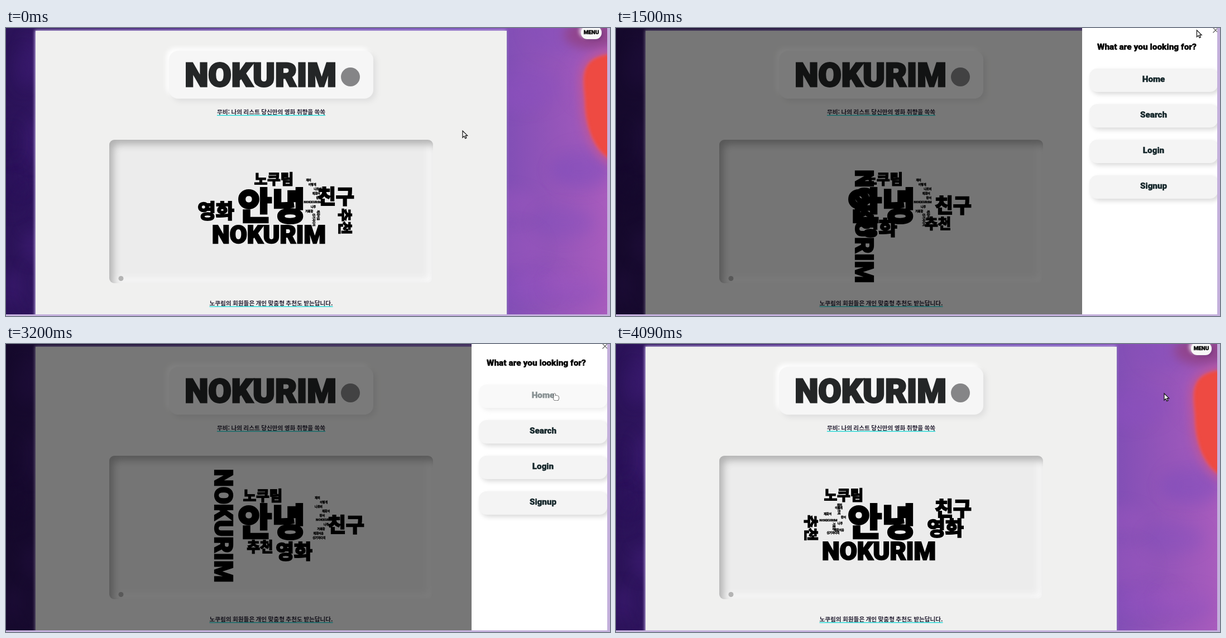
An HTML page with a canvas that plays this animation: 1082 by 518 pixels, repeating every 4160 ms.

```html
<!DOCTYPE html>
<html lang="ko">
<head>
<meta charset="utf-8">
<title>NOKURIM</title>
<style>
html, body { margin: 0; width: 100%; height: 100%; overflow: hidden; background: #c4b0dc; }
#view { position: absolute; left: 0; top: 0; width: 1077px; height: 515px; overflow: hidden; }
#view * { position: absolute; box-sizing: border-box; }
canvas { left: 0; top: 0; }
.panel { left: 53px; top: 5px; width: 844px; height: 530px; background: #f0f0ef;
  box-shadow: 1px 0 2px rgba(110, 95, 165, .8), -1px -1px 5px #dfcdfb; }
.card { left: 292px; top: 41px; width: 366px; height: 86px; border-radius: 16px; background: #f6f6f6;
  box-shadow: 5px 5px 10px #dfdfdf, -5px -5px 9px #fff; }
.well { left: 185px; top: 201px; width: 580px; height: 258px; border-radius: 9px; background: #ececec;
  box-shadow: inset 7px 8px 14px #b0b0b0, inset -7px -7px 14px #fafafa; }
.menu, .drawer { font: 900 15.2px Roboto, Arial, sans-serif; text-align: center; white-space: nowrap;
  -webkit-text-stroke: .4px; }
.menu { left: 1030px; top: -3px; width: 37px; height: 23px; border-radius: 11px; background: #f7f7f7;
  font-size: 9.8px; line-height: 21px; color: #000;
  box-shadow: -3px -3px 6px rgba(255, 255, 255, .75), 2px 2px 4px rgba(60, 20, 90, .3); }
.dim { left: 0; top: 0; width: 1077px; height: 515px; background: #000; }
.drawer { left: 834px; top: 0; width: 256px; height: 515px; background: #fff; }
.title { left: 16px; top: 24px; width: 200px; font-size: 15.4px; line-height: 20px; color: #000; }
.close { left: 234px; top: -1px; width: 10px; height: 10px; }
.link { left: 13px; width: 230px; height: 42px; border-radius: 14px; background: #f4f4f4; color: #14262a;
  line-height: 38px; box-shadow: 4px 4px 8px #dadada, -4px -4px 6px #fff; }
.bare { background: none; }
.bare .title, .bare .close { display: none; }
.bare .link { box-shadow: 3px 3px 6px rgba(90, 40, 110, .2), -4px -4px 7px rgba(255, 255, 255, .8); }
</style>
</head>
<body>
<div id="view">
  <canvas id="back" width="1077" height="515"></canvas>
  <div class="panel"></div>
  <div class="card"></div>
  <div class="well"></div>
  <canvas id="page" width="1077" height="515"></canvas>
  <div class="menu">MENU</div>
  <div class="dim"></div>
  <div class="drawer">
    <div class="title">What are you looking for?</div>
    <svg class="close" viewBox="0 0 10 10"><path d="M.5 .5 9.5 9.5M9.5 .5 .5 9.5" stroke="#555" stroke-width="1.1"/></svg>
    <div class="link">Home</div>
    <div class="link">Search</div>
    <div class="link">Login</div>
    <div class="link">Signup</div>
  </div>
  <canvas id="pointer" width="1077" height="515"></canvas>
</div>
<script>
const LOOP = 4160;
const LATIN = 'Roboto, Arial, sans-serif';
const HANGUL = '"Noto Sans CJK KR", "Noto Sans CJK", sans-serif';
const $ = s => document.querySelector(s);
const pen = id => $(id).getContext('2d');
const back = pen('#back'), page = pen('#page'), pointer = pen('#pointer');
const dim = $('.dim'), drawer = $('.drawer'), home = $('.link');
document.querySelectorAll('.link').forEach((el, i) => { el.style.top = 73 + 64.1 * i + 'px'; });

const span = (t, from, dur) => Math.max(0, Math.min(1, (t - from) / dur));
const mix = (a, b, k) => a + (b - a) * k;
const cubicOut = u => 1 - (1 - u) ** 3;
const easeInOut = u => u * u * (3 - 2 * u);

let seed = 7;
function random() {
  seed = seed * 16807 % 2147483647;
  return seed / 2147483647;
}

// Big words: text, size, delay, then [x, y, turned] in each of three layouts
const hello = ['안녕', 66, 0, [476, 319], [476, 319], [476, 319]];
const big = [
  hello,
  ['친구', 35.5, 0, [591, 303], [609, 325], [604, 296]],
  ['영화', 35.5, 16, [376, 329], [516, 373], [590, 331]],
  ['NOKURIM', 45, 102, [471, 371], [390, 327, 1], [471, 372]],
  ['추천', 25.5, 124, [608, 348, 1], [455, 364], [350, 331, 1]],
  ['노쿠림', 25.5, 148, [480, 271], [460, 272], [408, 271]]
];

// Small words fall down the free gap of each layout: x, y, half width, half height
const gaps = [[552, 309, 10, 40], [563, 312, 12, 40], [392, 314, 18, 28]];
const small = '재미 이렇게 나르비 재회어 만어 NOKKURIM 나무 거룩한 재회어음 신기하다의'.split(' ')
  .map((text, i, all) => {
    const row = 2 * (i + .5) / all.length - 1;
    const spots = gaps.map(([x, y, w, h]) => [x + w * (2 * random() - 1), y + h * row, random() < .2]);
    return [text, text < 'a' ? 6.2 : 5, 165 + i * 5, ...spots];
  });
const words = [...big, ...small];

// Heavy text centred on a point
function heavy(c, text, size, x, y, turned) {
  const latin = text < 'a';
  c.save();
  c.translate(x, y);
  if (turned) c.rotate(Math.PI / 2);
  c.font = `900 ${size}px ${latin ? LATIN : HANGUL}`;
  c.textAlign = 'center';
  c.lineJoin = 'miter';
  c.miterLimit = 3;
  c.lineWidth = size * (latin ? .05 : .07);
  const base = size * (latin ? .356 : .375);
  c.fillText(text, 0, base);
  c.strokeText(text, 0, base);
  c.restore();
}

function caption(text, y) {
  page.font = `700 10.65px ${HANGUL}`;
  page.textAlign = 'center';
  const w = page.measureText(text).width;
  page.fillStyle = '#3fdcda';
  page.fillRect(475 - w / 2, y + 1.2, w, 1.7);
  page.fillStyle = '#252033';
  page.fillText(text, 475, y);
}

function dot(x, y, r, color) {
  page.fillStyle = color;
  page.beginPath();
  page.arc(x, y, r, 0, 7);
  page.fill();
}

function drawPage(t) {
  page.clearRect(0, 0, 1077, 515);
  page.fillStyle = page.strokeStyle = '#242627';
  heavy(page, 'NOKURIM', 60, 456, 84);
  dot(617, 88, 17, '#858587');
  dot(206, 450.5, 4.5, '#b4b4b4');
  caption('무비: 나의 리스트 당신만의 영화 취향을 쏙쏙', 155);
  caption('노쿠림의 회원들은 개인 맞춤형 추천도 받는답니다.', 499);

  page.fillStyle = page.strokeStyle = '#000';
  const step = t < 2600 ? 0 : 1;
  const start = step ? 3530 : 1344;
  for (const [text, size, delay, ...spots] of words) {
    const a = spots[step], b = spots[step + 1];
    const u = span(t, start + delay, 450), k = cubicOut(u);
    heavy(page, text, size, mix(a[0], b[0], k), mix(a[1], b[1], k), u > 0 ? b[2] : a[2]);
  }
}

function blob(x, y, rx, ry, color, blur) {
  back.filter = `blur(${blur}px)`;
  back.fillStyle = color;
  back.beginPath();
  back.ellipse(x, y, rx, ry, 0, 0, 7);
  back.fill();
}

// Soft patches of cloud down a column
function clouds(x, w, colors) {
  for (let i = 0; i < 14; i++) {
    blob(x + w * random(), 515 * random(), w * .3, 20 + 30 * random(), colors[i % colors.length], 12);
  }
}

function flame(grow, color, blur) {
  back.filter = `blur(${blur}px)`;
  back.fillStyle = back.strokeStyle = color;
  back.lineWidth = grow;
  back.beginPath();
  back.moveTo(1100, 48);
  back.bezierCurveTo(1020, 48, 1038, 95, 1039, 135);
  back.bezierCurveTo(1040, 185, 1062, 235, 1100, 240);
  back.fill();
  back.stroke();
}

function drawBack() {
  const g = back.createLinearGradient(0, 0, 1077, 0);
  ['#2b1358', '#42207a', '#6843a6', '#6f48b2', '#a85cbd'].forEach((c, i) => g.addColorStop(i / 4, c));
  back.fillStyle = g;
  back.fillRect(0, 0, 1077, 515);
  clouds(0, 50, ['#34166620', '#4a248460', '#2a125860']);
  clouds(900, 177, ['#8c50be70', '#a058c060', '#7d4dbb50']);
  blob(1050, 12, 50, 26, '#91458e', 9);
  flame(22, '#b8569f', 8);
  flame(4, '#e05a72', 3);
  flame(1, '#ee4a42', 2);
}

// Pointer stops: time, x, y
const path = [[70, 818, 185], [540, 1016, 17], [820, 1041, 4], [2040, 1040, 4], [2470, 996, 66], [2600, 982, 89]];

function place(t) {
  const i = path.findIndex(p => p[0] > t);
  if (i < 1) return path.at(i).slice(1);
  const [t0, x0, y0] = path[i - 1], [t1, x1, y1] = path[i];
  const k = span(t, t0, t1 - t0);
  return [mix(x0, x1, k), mix(y0, y1, k)];
}

const arrow = new Path2D('M0 0V12L2.8 9.4 4.8 13.6 6.9 12.7 5 8.6H8.7Z');

function drawPointer(t) {
  const [x, y] = place(t);
  const isHand = t > 640 && t < 1260 || t > 2530 && t < 3465;
  const c = pointer;
  c.clearRect(0, 0, 1077, 515);
  c.save();
  c.translate(x, y);
  c.lineWidth = 1.2;
  c.strokeStyle = '#111';
  c.fillStyle = '#fff';
  if (isHand) {
    // palm with a raised finger
    c.beginPath();
    c.roundRect(-1, 4, 9, 8.5, 3);
    c.roundRect(-.5, 0, 2.6, 8, 1.3);
    c.stroke();
    c.fill();
  } else {
    c.fill(arrow);
    c.stroke(arrow);
  }
  c.restore();
}

function drawDrawer(t) {
  const open = easeInOut(span(t, 1212, 300)), shut = easeInOut(span(t, 3360, 360));
  drawer.style.display = t > 1212 && shut < 1 ? '' : 'none';
  drawer.style.transform = `translateX(${256 * (1 - open + shut)}px)`;
  drawer.classList.toggle('bare', t > 3500);
  dim.style.opacity = .5 * (span(t, 1212, 150) - span(t, 3372, 150));
  home.style.opacity = 1 - .5 * easeInOut(span(t, 2690, 310)) - .18 * span(t, 3400, 130);
}

function frame(now) {
  const t = now % LOOP;
  drawPage(t);
  drawDrawer(t);
  drawPointer(t);
  requestAnimationFrame(frame);
}

drawBack();
frame(0);
</script>
</body>
</html>
```
